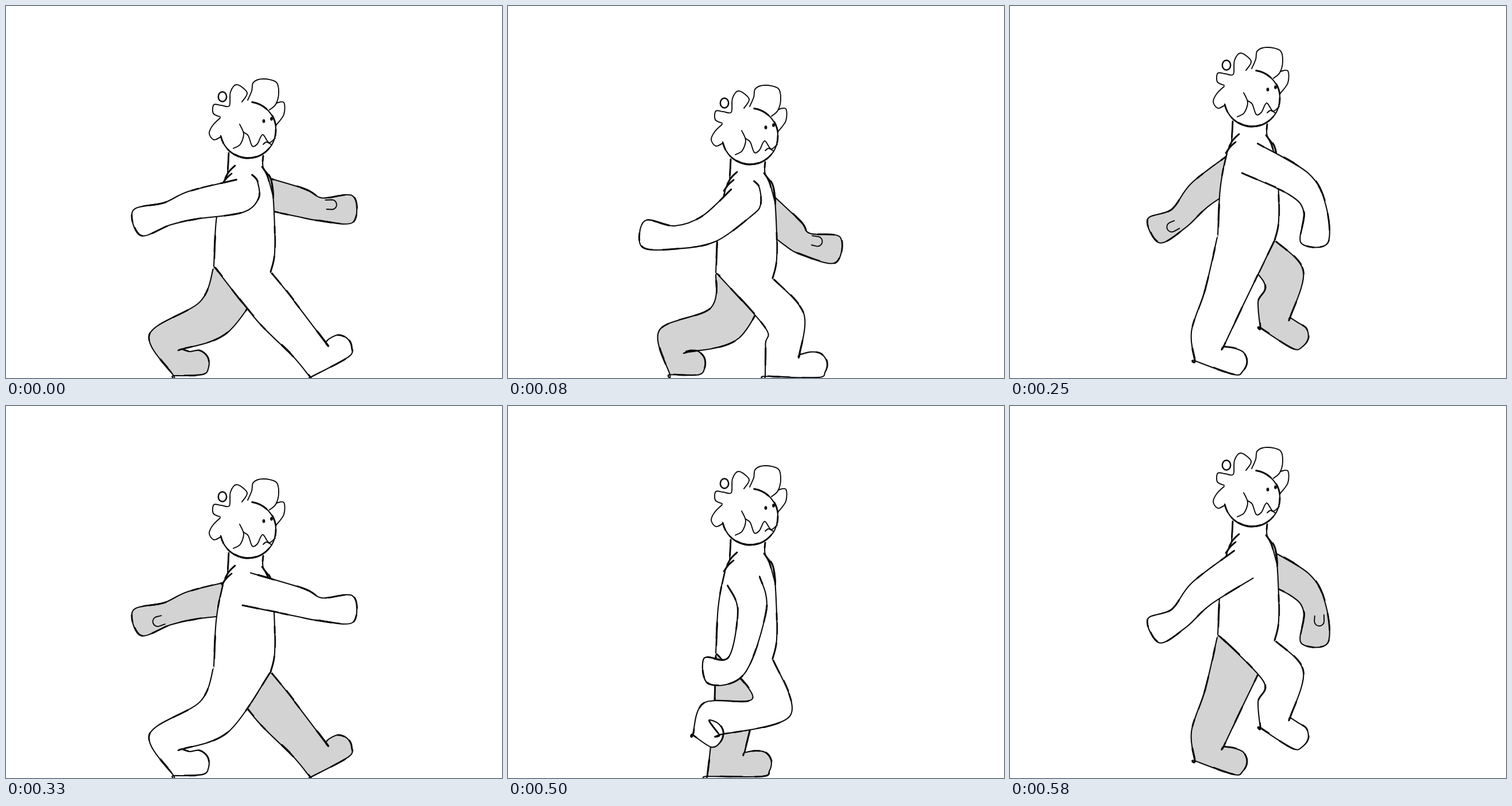
Recreate the animation shown at these times as an HTML page with a canvas. Size 864x648 px, loop 0.66 s.

```html
<!DOCTYPE html>
<html lang="en">
<head>
<meta charset="utf-8">
<title>Walk cycle</title>
<style>
html, body { margin: 0; width: 100%; height: 100%; overflow: hidden; background: #fff; }
canvas { display: block; }
</style>
</head>
<body>
<canvas id="stage" width="864" height="648"></canvas>
<script>
const ctx = document.getElementById('stage').getContext('2d');
const INK = '#0a0a0a', GREY = '#d3d3d3', WHITE = '#fff';
const LOOP = 660, STEPS = 8, FPS = 12;
const ARM_WIDTHS = [29, 25, 20, 23];
const LEG_WIDTHS = [50, 36, 31, 0];
const TOE = 23;

// Vectors
const add = (a, b, k = 1) => [a[0] + b[0] * k, a[1] + b[1] * k];
const sub = (a, b) => add(a, b, -1);
const unit = v => { const n = Math.hypot(...v) || 1; return [v[0] / n, v[1] / n]; };
const normal = v => [v[1], -v[0]];
const corner = p => [p, p];

// Smooth curve through points; a repeated point makes a sharp corner.
function curve(pts) {
  const path = new Path2D();
  const at = i => pts[Math.max(0, Math.min(pts.length - 1, i))];
  path.moveTo(...pts[0]);
  for (let i = 0; i < pts.length - 1; i++) {
    const [a, b, c, d] = [at(i - 1), at(i), at(i + 1), at(i + 2)];
    path.bezierCurveTo(...add(b, sub(c, a), 1 / 6), ...sub(c, sub(d, b).map(v => v / 6)), ...c);
  }
  return path;
}

function fill(path, colour) {
  ctx.fillStyle = colour;
  ctx.fill(path);
}

function ink(path, width = 1.9) {
  ctx.lineWidth = width;
  ctx.stroke(path);
}

// A pen line with heavier patches and a loose second pass.
function sketch(path) {
  ink(path, 2.1);
  ctx.save();
  ctx.setLineDash([28, 40, 12, 50]);
  ink(path, 2.9);
  ctx.translate(1, -0.8);
  ctx.setLineDash([38, 50, 20, 70]);
  ctx.lineDashOffset = 45;
  ink(path, 1.6);
  ctx.restore();
}

// Both edges of a chain of joints, each offset along the bisecting normal.
function edges(joints, widths) {
  const dirs = joints.slice(1).map((p, i) => unit(sub(p, joints[i])));
  const side = sign => joints.map((p, i) => {
    const before = dirs[Math.max(0, i - 1)], after = dirs[Math.min(dirs.length - 1, i)];
    return add(p, normal(unit(add(before, after))), sign * widths[i]);
  });
  return { front: side(1), back: side(-1) };
}

function paint(path, colour) {
  fill(path, colour);
  sketch(path);
}

function drawArm(chain, lift, colour) {
  const swing = Math.max(-1, Math.min(1, (chain[2][0] - 412) / 150));
  const joints = [[413 + 6 * swing, 325 - 6 * swing + lift], ...chain];
  const { front, back } = edges(joints, ARM_WIDTHS);
  const outline = [...back, ...front.reverse()];
  const rounded = swing <= -1 && lift >= 0;
  if (rounded) outline.push([440, 335 + lift], [438, 306 + lift], [428, 294 + lift]);
  paint(curve(outline), colour);
  if (colour === GREY) drawThumb(joints[2], joints[3]);
}

function drawThumb(wrist, tip) {
  const along = sub(tip, wrist);
  const at = add(add(wrist, along, 0.36), normal(unit(along)), 8);
  ctx.save();
  ctx.translate(...at);
  ctx.rotate(Math.atan2(along[1], along[0]));
  const hook = new Path2D();
  hook.moveTo(-11, -8);
  hook.arc(0, 0, 8.5, -Math.PI / 2, Math.PI / 2);
  hook.lineTo(-9, 8);
  ink(hook);
  ctx.restore();
}

function drawLeg([knee, ankle, heel, toe], lift, colour) {
  const { front, back } = edges([[412, 458 + lift], knee, ankle, heel], LEG_WIDTHS);
  const dir = Math.atan2(toe[1] - heel[1], toe[0] - heel[0]);
  const toes = [-2, -1, 0, 1, 2].map(i => {
    const a = dir + i * Math.PI / 4;
    return [toe[0] + TOE * Math.cos(a), toe[1] + TOE * Math.sin(a)];
  });
  paint(curve([
    [461, 463 + lift], front[1], ...corner(front[2]), ...toes,
    ...corner(heel), back[2], back[1], [362, 453 + lift]
  ]), colour);
}

const leftSide = [[399, 278], [386, 292], [376, 318], [366, 375], [362, 453]];
const rightSide = [[448, 261], [448, 281], [462, 305], [467, 360], [468, 430], [461, 463]];
const torso = {
  body: curve([...leftSide, [362, 453], ...corner([412, 480]), [461, 463], ...rightSide.reverse()]),
  lines: [
    leftSide, rightSide,
    [[388, 256], [387, 275], [386, 292]],
    [[393, 292], [384, 300], [376, 311]],
    [[446, 280], [455, 295], [465, 330]]
  ].map(curve)
};

const face = new Path2D();
face.ellipse(421.5, 216, 48.5, 49, 0, -1.42, 2.94);
const jaw = new Path2D();
jaw.ellipse(421.5, 216, 48.5, 49, 0, 0.7, 2.4);
const ring = new Path2D();
ring.ellipse(377, 158, 7.2, 8.5, 0, 0, 7);

const features = [
  [[374, 228], [362, 233], [354, 222], [360, 208], [373, 195]],
  [[373, 193], [361, 187], [362, 172], [375, 173], [389, 174], [391, 150], [402, 137], [420, 151], [411, 167]],
  [[421, 164], [428, 148], [431, 133], [448, 127], [471, 133], [475, 152], [470, 171], [459, 181]],
  [[471, 169], [484, 168], [484, 189], [471, 207]],
  [[407, 206], [414, 223], [408, 241], [396, 248]],
  [[414, 220], [422, 226], [429, 244], [438, 240], [447, 224], [458, 238], [469, 230]],
  [[448, 241], [454, 237], [463, 242]]
].map(curve);

function drawEye(x, y) {
  const eye = new Path2D();
  eye.ellipse(x, y, 2.4, 3.2, 0, 0, 7);
  fill(eye, INK);
}

function drawHead() {
  fill(face, WHITE);
  sketch(face);
  ink(jaw, 2.6);
  ink(ring, 2.5);
  features.forEach(f => ink(f));
  drawEye(449, 200.5);
  drawEye(462.5, 196.5);
}

function lifted(dy, draw) {
  ctx.save();
  ctx.translate(0, dy);
  draw();
  ctx.restore();
}

// Arms: elbow, wrist, fingertips. Legs: knee, ankle, heel, toe.
const hanging = [[425, 355], [398, 452], [346, 462]];
const keys = [
  { // stride
    lift: 0,
    arms: [[[325, 347], [281, 362], [228, 378]], [[511, 342], [547, 354], [604, 354]]],
    legs: [[[465, 525], [528, 598], [530, 647], [579, 596]], [[363, 541], [278, 585], [292, 644], [331, 622]]]
  },
  { // dip
    lift: 11,
    arms: [[[350, 388], [292, 403], [236, 397]], [[492, 393], [517, 414], [574, 425]]],
    legs: [[[481, 547], [478, 598], [448, 645], [533, 625]], [[378, 552], [288, 584], [282, 642], [321, 622]]]
  },
  { // passing
    lift: -23,
    arms: [hanging, hanging],
    legs: [[[395, 525], [383, 592], [347, 645], [436, 623]], [[459, 524], [355, 545], [322, 573], [352, 571]]]
  },
  { // rise
    lift: -55,
    arms: [[[503, 310], [531, 353], [530, 413]], [[333, 327], [294, 370], [250, 392]]],
    legs: [[[374, 505], [344, 580], [322, 618], [390, 619]], [[476, 470], [460, 529], [436, 561], [497, 574]]]
  }
];

// The second half of the walk swaps the near and far sides.
function drawStep(step) {
  const { lift, arms, legs } = keys[step % keys.length];
  const near = step < keys.length ? 0 : 1, far = 1 - near;
  ctx.fillStyle = WHITE;
  ctx.fillRect(0, 0, 864, 648);
  ctx.strokeStyle = INK;
  ctx.lineCap = ctx.lineJoin = 'round';
  drawArm(arms[far], lift, GREY);
  drawLeg(legs[far], lift, GREY);
  drawLeg(legs[near], lift, WHITE);
  lifted(lift, () => {
    fill(torso.body, WHITE);
    torso.lines.forEach(sketch);
  });
  drawArm(arms[near], lift, WHITE);
  lifted(lift, drawHead);
}

const startOf = step => Math.round(step * 100 / FPS) * 10;

function tick() {
  const t = performance.now() % LOOP;
  let step = STEPS - 1;
  while (startOf(step) > t) step--;
  drawStep(step);
  requestAnimationFrame(tick);
}
tick();
</script>
</body>
</html>
```
